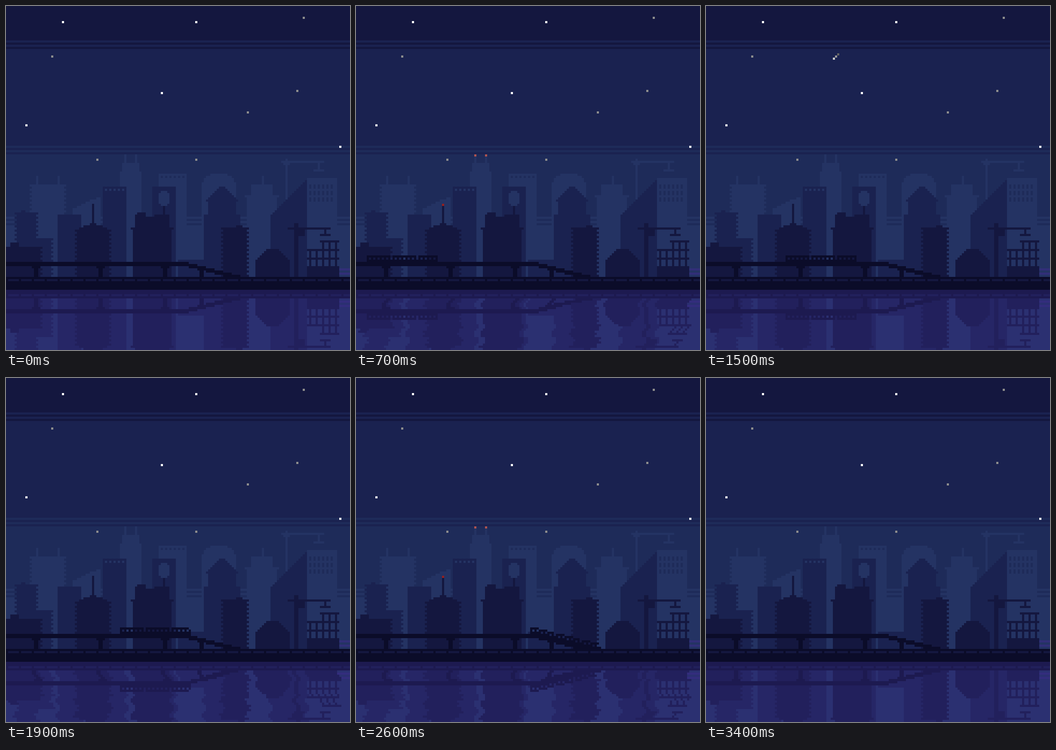
Recreate the animation shown at these times as an HTML page with a canvas. Size 640 px wide and 640 px high, loop 3.5 s.

```html
<!DOCTYPE html>
<html lang="en">
<head>
<meta charset="utf-8">
<title>Night city</title>
<style>
html, body { margin: 0; width: 100%; height: 100%; overflow: hidden; background: #14173f; }
canvas { display: block; width: 100vw; height: 100vh; image-rendering: pixelated; }
</style>
</head>
<body>
<canvas id="view" width="160" height="160"></canvas>
<script>
// Everything is drawn on a 160 x 160 grid of cells.
const SIZE = 160, GROUND = 126, WATER = 132, MIRROR = 261;
const STEP = 100, STEPS = 35;
const SKY = ['#14173f', '#1a2250', '#1e2b59', '#243363', '#312f78'];
const NEAR = SKY[0], MID = SKY[1], FAR = SKY[3], BRIDGE = '#0b0c29';

const view = document.getElementById('view').getContext('2d');
const layer = () => {
  const c = document.createElement('canvas');
  c.width = c.height = SIZE;
  return c.getContext('2d');
};
const city = layer(), scene = layer();
let g = city;

const ink = color => { g.fillStyle = color; };
const box = (x, y, w, h) => g.fillRect(x, y, w, h);
// From (x0, y) to column x1, standing on the ground
const tower = (x0, x1, y) => box(x0, y, x1 - x0, GROUND - y);
const dots = (x, y, n, h = 1) => { for (let i = 0; i < n; i++) box(x + i * 2, y, 1, h); };
// Stacked one-cell rows growing by `grow` on each side
const steps = (x0, x1, y, n, grow = 1) => {
  for (let i = 0; i < n; i++) box(x0 - i * grow, y + i, x1 - x0 + 2 * i * grow, 1);
};
const teeth = (x, y) => { for (; y < GROUND; y += 2) box(x, y, 1, 1); };

function drawSky() {
  ink(SKY[0]);
  box(0, 0, SIZE, SIZE);
  [16, 65, 98, 122].forEach((y, i) => {
    ink(SKY[i + 1]);
    box(0, y, SIZE, SIZE - y);
    ink(SKY[i]);
    box(0, y + 1, SIZE, 1);
    box(0, y + 3, SIZE, 1);
  });
  ink('#ffffff');
  [[26, 7], [88, 7], [72, 40], [9, 55], [155, 65]].forEach(([x, y]) => box(x, y, 1, 1));
  ink('#8d8d8d');
  [[138, 5], [21, 23], [135, 39], [112, 49], [42, 71], [88, 71]].forEach(([x, y]) => box(x, y, 1, 1));
}

function drawFar() {
  ink(FAR);
  tower(12, 27, 83);
  teeth(11, 83);
  teeth(27, 83);
  box(14, 79, 1, 4);
  box(24, 79, 1, 4);

  for (let i = 0; i < 6; i++) box(42 - i * 2 - (i > 0), 89 + i, 2 + i * 2 + (i > 0), 1);
  tower(31, 44, 95);

  tower(54, 62, 73);
  tower(53, 63, 77);
  box(55, 69, 1, 4);
  box(60, 69, 1, 4);

  tower(71, 84, 78);

  box(95, 78, 8, 1);
  box(93, 79, 12, 1);
  box(92, 80, 14, 2);
  tower(91, 107, 82);

  tower(114, 124, 83);
  box(119, 79, 1, 4);
  box(111, 88, 16, 1);
  tower(112, 126, 88);

  box(130, 71, 1, 30);
  box(128, 72, 20, 1);
  box(129, 73, 3, 1);
  box(145, 73, 1, 3);
  box(143, 76, 5, 1);

  tower(140, 154, 80);
  ink(SKY[2]);
  dots(72, 79, 6);
  for (let y = 83; y < 92; y += 3) dots(141, y, 6, 2);
}

function drawMid() {
  ink(MID);
  tower(5, 14, 96);
  teeth(4, 96);
  teeth(14, 96);
  box(7, 95, 2, 1);
  tower(14, 21, 108);
  teeth(21, 108);
  tower(24, 35, 97);
  tower(45, 56, 84);
  tower(68, 79, 84);

  steps(99, 102, 84, 7);
  box(94, 91, 13, 6);
  tower(92, 109, 97);
  tower(80, 96, 118);

  for (let x = 123; x < 140; x++) tower(x, x + 1, 220 - x);

  ink(FAR);
  dots(46, 85, 5);
  box(72, 86, 3, 7);
  box(71, 87, 5, 5);
}

function drawNear() {
  ink(NEAR);
  tower(0, 16, 112);
  teeth(16, 112);
  box(2, 110, 4, 2);

  box(40, 92, 1, 9);
  box(39, 101, 3, 1);
  box(36, 102, 9, 1);
  box(34, 103, 13, 1);
  tower(33, 48, 104);
  teeth(32, 104);
  teeth(48, 104);

  box(73, 93, 1, 5);
  box(61, 96, 4, 2);
  box(60, 97, 5, 1);
  box(69, 97, 7, 1);
  box(60, 98, 16, 5);
  box(58, 103, 20, 1);
  tower(59, 77, 103);

  tower(101, 112, 103);
  teeth(100, 103);
  teeth(112, 103);
  box(107, 102, 3, 1);

  steps(121, 127, 113, 6);
  tower(116, 132, 118);

  tower(134, 136, 101);
  box(131, 103, 20, 1);
  box(136, 104, 3, 3);
  box(148, 104, 1, 2);
  box(146, 106, 5, 1);

  box(146, 109, 9, 1);
  box(140, 113, 15, 1);
  box(140, 117, 15, 1);
  tower(140, 155, 121);
  for (let x = 141; x < 155; x += 3) tower(x, x + 1, x < 147 ? 113 : 109);
}

// How far the track has sunk at column x
const drop = x => x < 85 ? 0 : Math.floor((x - 85) / 4) + 1 + (x >= 113);

function drawBridge() {
  ink(BRIDGE);
  box(0, 119, 85, 2);
  for (let x = 85; x < 109; x++) box(x, 119 + drop(x), 1, 2);
  [12, 42, 72].forEach(x => {
    box(x, 121, 4, 1);
    tower(x + 1, x + 3, 121);
  });
  tower(90, 92, 122);
}

function drawRoad() {
  ink(BRIDGE);
  box(0, GROUND, SIZE, WATER - GROUND);
  ink(NEAR);
  for (let x = 1; x < SIZE; x += 6) box(x, GROUND + 1, 5, 1);
}

function drawTrain(k) {
  if (k < 1 || k > 33) return;
  const left = 5 + 4 * (k - 7);
  ink(BRIDGE);
  for (let i = 0; i < 33; i++) {
    const x = left + i, y = 116 + drop(x), col = i % 12;
    if (col === 11) box(x, y + 2, 1, 1);
    else if (col % 2) { box(x, y, 1, 1); box(x, y + 2, 1, 1); }
    else box(x, y, 1, 3);
  }
}

function drawLights(k) {
  if (k % 16 >= 4 && k % 16 < 12 && k < 28) {
    ink('#ad5350');
    box(55, 69, 1, 1);
    box(60, 69, 1, 1);
  }
  if (k % 20 >= 6 && k % 20 < 14) {
    ink('#95201f');
    box(40, 92, 1, 1);
  }
}

function drawMeteor(k) {
  if (k < 10 || k > 16) return;
  const head = Math.min(11, 3 * (k - 9));
  const tail = Math.max(0, Math.round(2 + (k - 12) * 2.33));
  for (let i = tail; i <= head; i++) {
    const glow = (i - tail + 1) / (head - tail + 1);
    const v = Math.round(75 + 150 * glow - (k > 12 ? 25 : 0));
    ink(`rgb(${v},${v},${v})`);
    box(70 - i, 13 + i, 1, 1);
  }
}

function drawWater(k) {
  const swell = 1.45 * Math.sqrt(Math.abs(Math.sin(Math.PI * k / 17))) * (k % 17 > 14 ? 0.4 : 1);
  for (let y = WATER; y < SIZE; y++) {
    const calm = y < 135 || (y > 140 && y < 147);
    const shift = calm ? 0 : Math.round(swell * Math.sin(y * 0.95 + k * 0.7));
    const from = MIRROR - y;
    view.drawImage(scene.canvas, 0, from, SIZE, 1, 0, y, SIZE, 1);
    if (shift) view.drawImage(scene.canvas, 0, from, SIZE, 1, shift, y, SIZE, 1);
  }
  view.fillStyle = 'rgba(54,45,130,0.44)';
  view.fillRect(0, WATER, SIZE, SIZE - WATER);
}

function frame(now) {
  const k = Math.floor(now / STEP) % STEPS;
  g = scene;
  g.drawImage(city.canvas, 0, 0);
  drawMeteor(k);
  drawLights(k);
  drawTrain(k);
  drawRoad();
  view.drawImage(scene.canvas, 0, 0);
  drawWater(k);
  requestAnimationFrame(tick);
}

let start;
function tick(now) {
  start ??= now;
  frame(Math.max(0, now - start));
}

drawSky();
drawFar();
drawMid();
drawNear();
drawBridge();
requestAnimationFrame(tick);
</script>
</body>
</html>
```
